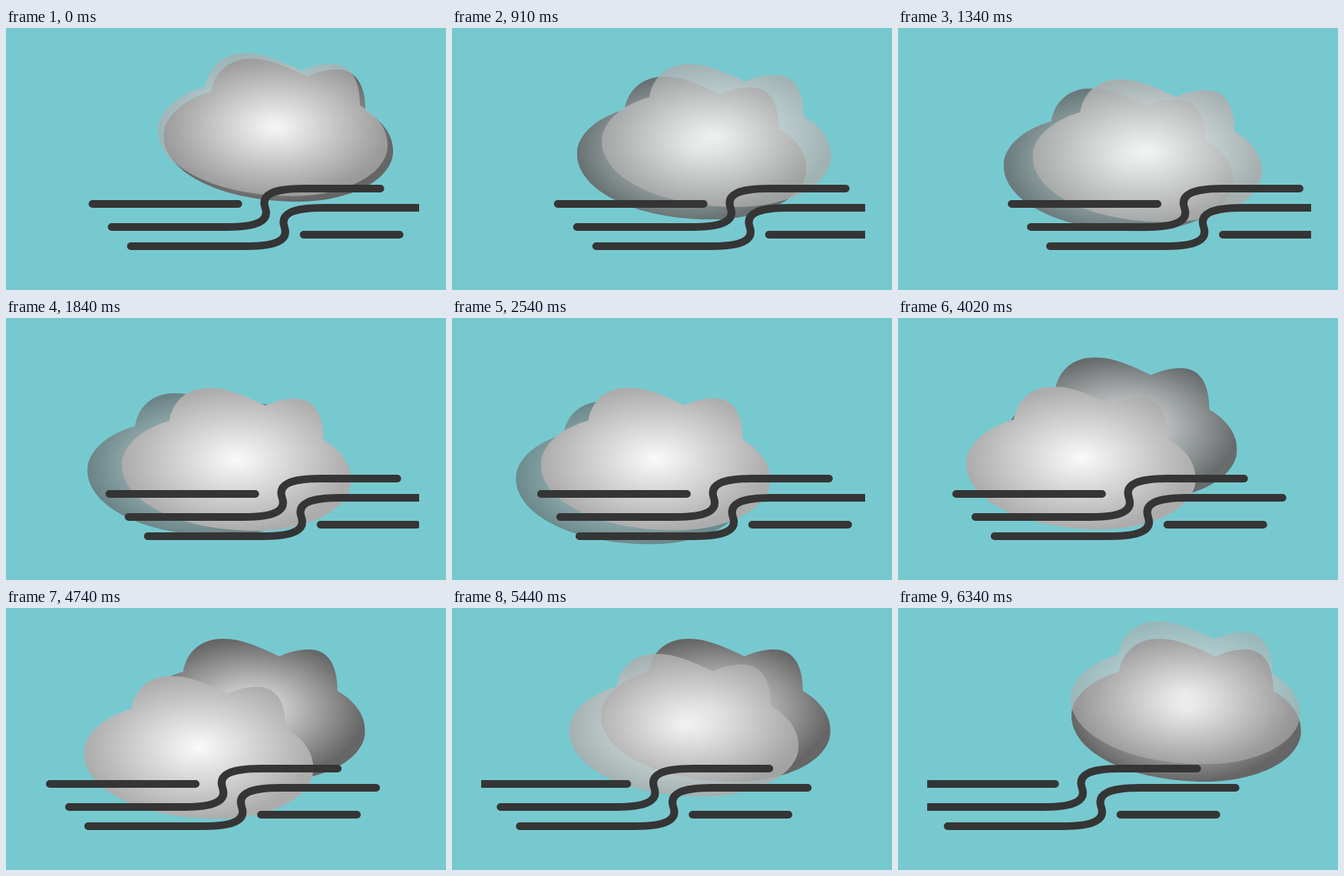
An HTML page with a canvas that plays this animation: 573 px wide and 341 px high, repeating every 6.44 s.

```html
<!DOCTYPE html>
<html lang="en">
<head>
<meta charset="utf-8">
<title>Windy clouds</title>
<style>
  html, body { margin: 0; width: 100%; height: 100%; overflow: hidden; background: #77c9d0; }
  canvas { display: block; width: 573px; height: 341px; }
</style>
</head>
<body>
<canvas id="stage" width="573" height="341"></canvas>
<script>
const ctx = document.getElementById('stage').getContext('2d');
const LOOP = 6440;
const START = 332;
const W = 299, H = 186;

const cloudShape = new Path2D(
  'M62 43C66 18 84 0 114 0C140 0 164 12 187 23C203 16 214 14 226 14' +
  'C252 14 263 36 263 68C284 80 299 98 299 120C299 158 242 186 175 186' +
  'C80 186 0 150 0 100C0 76 26 53 62 43Z');

// An S-curve that lifts a line by 50
const bend = 'c40 0 56 -8 50 -25s10 -25 50 -25';
const wind = new Path2D(
  `M113 229H303M138 259H288${bend}H488M163 284H313${bend}H538M388 269H513`);

// Stops are evenly spaced over the period: x, y, opacity
const dark = {
  period: 8000,
  stops: [[201, 40, 1], [75, 116.5, 0.6], [154, 40, 1], [226, 40, 1]],
  fill: glow('#f2f2f2', '#666666')
};
const light = {
  period: 6000,
  stops: [[225, 17, 0.65], [151, 91, 1], [76, 90, 1], [103, 88.5, 1]],
  fill: glow('#fafafa', '#acacac')
};

function glow(center, edge) {
  const fill = ctx.createRadialGradient(0, 0, 0, 0, 0, 1);
  fill.addColorStop(0, center);
  fill.addColorStop(1, edge);
  return fill;
}

const mix = (a, b, k) => a + (b - a) * k;
const wrap = (v, n) => ((v % n) + n) % n;

function pose({ period, stops }, t) {
  const pos = wrap(t - START, period) / period * stops.length;
  const i = Math.floor(pos);
  const next = stops[(i + 1) % stops.length];
  return stops[i].map((v, j) => mix(v, next[j], pos - i));
}

// Back and forth, five seconds each way
function windShift(t) {
  const away = Math.abs(wrap(t - START + 4000, 10000) - 5000) / 5000;
  return mix(35.2, -98.6, away);
}

function drawCloud(cloud, t) {
  const [x, y, alpha] = pose(cloud, t);
  ctx.save();
  ctx.globalAlpha = alpha;
  ctx.translate(x, y);
  ctx.clip(cloudShape);
  ctx.translate(W / 2, H / 2);
  ctx.scale(W / 2, H / 2);
  ctx.fillStyle = cloud.fill;
  ctx.fillRect(-1, -1, 2, 2);
  ctx.restore();
}

function drawWind(t) {
  ctx.save();
  ctx.beginPath();
  ctx.rect(38, 0, 500, 341);
  ctx.clip();
  ctx.translate(windShift(t), 0);
  ctx.strokeStyle = '#353535';
  ctx.lineWidth = 10;
  ctx.lineCap = 'round';
  ctx.stroke(wind);
  ctx.restore();
}

function draw(t) {
  ctx.fillStyle = '#77c9d0';
  ctx.fillRect(0, 0, 573, 341);
  drawCloud(dark, t);
  drawCloud(light, t);
  drawWind(t);
}

// The picture changes ten times a second
const held = t => Math.max(0, Math.floor((t - 10) / 100) * 100 + 40);

const begin = performance.now();
function loop() {
  draw(held((performance.now() - begin) % LOOP));
  requestAnimationFrame(loop);
}
loop();
</script>
</body>
</html>
```
